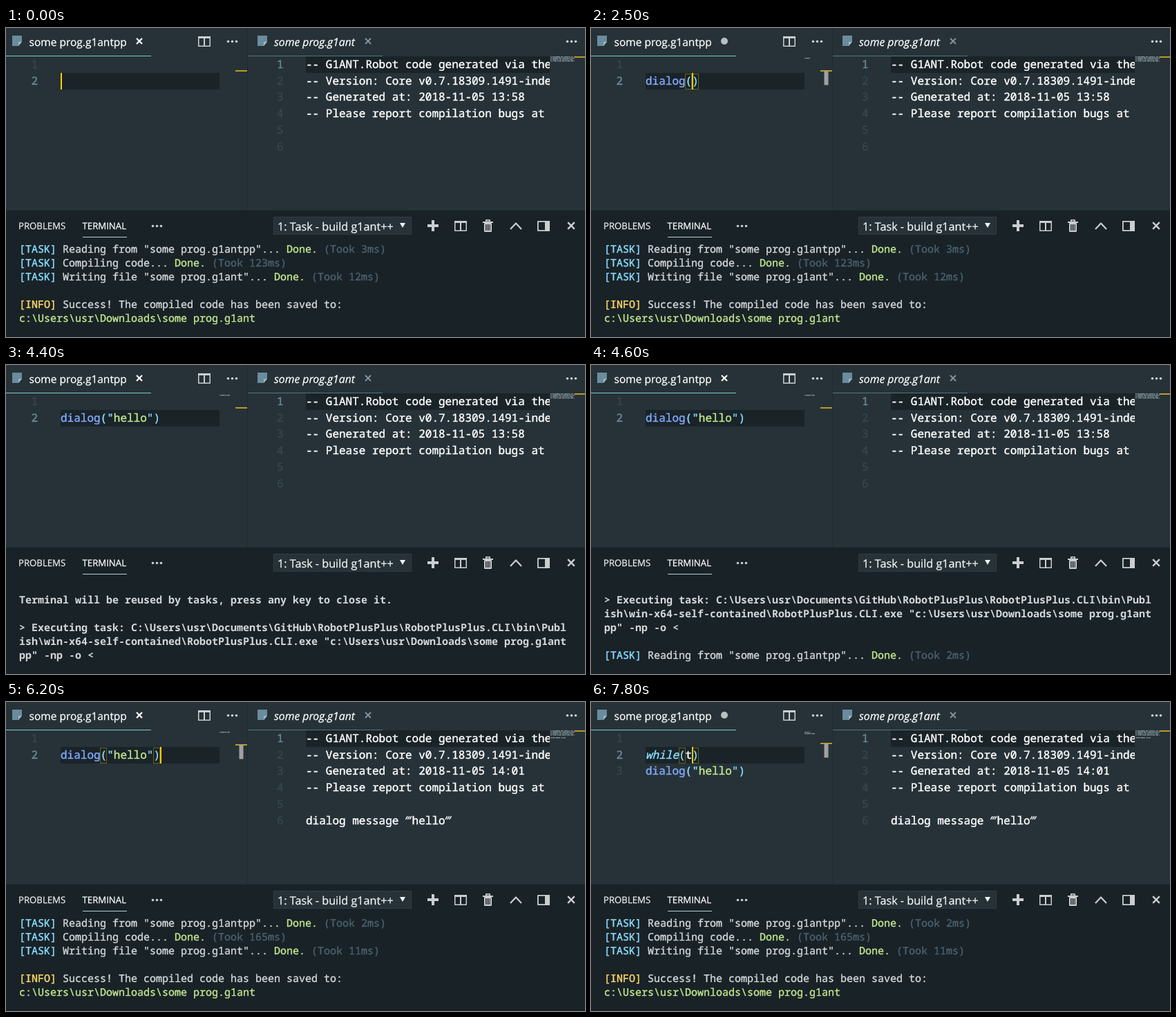
These frames come from a looping animation (838 by 447 pixels, 8000 ms). An HTML page with a canvas:

```html
<!DOCTYPE html>
<html lang="en">
<head>
<meta charset="utf-8">
<title>Editor</title>
<style>
html, body { margin: 0; width: 100%; height: 100%; overflow: hidden; background: #263238; }
canvas { display: block; width: 838px; height: 447px; }
</style>
</head>
<body>
<canvas id="stage" width="838" height="447"></canvas>
<script>
const ctx = document.getElementById('stage').getContext('2d');
const LOOP = 8000;
const MONO = '"Noto Sans Mono", "DejaVu Sans Mono", monospace';
const UI = '"Open Sans", "Noto Sans", sans-serif';
const C = {
  bg: '#263238', panel: '#192227', row: '#1a2328', text: '#ffffff', term: '#d3d7d8',
  cyan: '#89ddff', blue: '#82aaff', green: '#c3e88d', yellow: '#ffd866', grey: '#4a616d',
  num: '#37474f', numOn: '#6c8b98', teal: '#80cbc4', caret: '#ffcc00', mark: '#bd9a22', icon: '#cbced0'
};

const FILE = 'c:\\Users\\usr\\Downloads\\some prog.g1ant';
const report = (a, b, c) => [
  `[TASK] Reading from "some prog.g1antpp"... Done. (Took ${a}ms)`,
  `[TASK] Compiling code... Done. (Took ${b}ms)`,
  `[TASK] Writing file "some prog.g1ant"... Done. (Took ${c}ms)`,
  '', '[INFO] Success! The compiled code has been saved to:', FILE
];
const before = report(3, 123, 12), after = report(2, 165, 11);
const task = [
  '> Executing task: C:\\Users\\usr\\Documents\\GitHub\\RobotPlusPlus\\RobotPlusPlus.CLI\\bin\\Publ',
  'ish\\win-x64-self-contained\\RobotPlusPlus.CLI.exe "c:\\Users\\usr\\Downloads\\some prog.g1ant',
  'pp" -np -o <'
];
const notice = 'Terminal will be reused by tasks, press any key to close it.';
const waiting = ['', notice, '', ...task];
const boldLines = [notice, ...task];

const typed = (text, col, more) => ({ lines: ['', text], col, on: true, ...more });
const second = (text, col, more) => ({ lines: ['', text, 'dialog("hello")'], col, on: true, ...more });

// Each step changes part of the state from its time onward.
const steps = [
  [0, { lines: ['', ''], row: 1, col: 0, on: true, dirty: false, match: null, term: before, built: false }],
  [400, { on: false }], [900, { on: true }], [1400, { on: false }],
  [1600, typed('d', 1, { dirty: true })], [1700, typed('di', 2)], [1800, typed('dia', 3)],
  [2000, typed('dial', 4)], [2100, typed('dialo', 5)], [2200, typed('dialog', 6)],
  [2500, typed('dialog()', 7, { match: [6, 7] })],
  [2800, typed('dialog("")', 8, { match: [6, 9] })], [2900, { match: null }],
  [3200, typed('dialog("h")', 9)], [3300, typed('dialog("he")', 10)],
  [3400, typed('dialog("hell")', 12)], [3600, typed('dialog("hello")', 13)],
  [4100, { on: false, dirty: false }],
  [4300, { term: waiting }],
  [4600, { term: [...waiting.slice(2), '', after[0]].slice(-6) }],
  [4700, { term: [task[2], '', ...after.slice(0, 3), ''], built: true }],
  [4900, { term: after, on: true }],
  [5400, { on: false }],
  [5900, { on: true, col: 14 }], [6000, { match: [6, 14] }], [6200, { col: 15 }],
  [6400, { row: 0, col: 0 }], [6500, { match: null }],
  [6700, second('', 0, { row: 1, dirty: true })],
  [6900, second('w', 1)], [7000, second('wh', 2)], [7100, second('whi', 3)],
  [7200, second('whil', 4)], [7300, second('while', 5)],
  [7600, second('while()', 6, { match: [5, 6] })],
  [7800, second('while(t)', 7, { match: [5, 7] })]
];
const stateAt = t => Object.assign({}, ...steps.filter(s => s[0] <= t).map(s => s[1]));
const baseline = i => Math.round(57.8 + i * 23.8);

function box(x, y, w, h, color) {
  ctx.fillStyle = color;
  ctx.fillRect(x, y, w, h);
}
function frame(x, y, w, h, color, width = 1) {
  ctx.strokeStyle = color;
  ctx.lineWidth = width;
  ctx.strokeRect(x + width / 2, y + width / 2, w - width, h - width);
}
function path(points, color, width) {
  ctx.beginPath();
  points.forEach(([x, y]) => ctx.lineTo(x, y));
  if (width) {
    ctx.strokeStyle = color;
    ctx.lineWidth = width;
    ctx.stroke();
  } else {
    ctx.fillStyle = color;
    ctx.fill();
  }
}
function disc(x, y, r, color) {
  ctx.beginPath();
  ctx.arc(x, y, r, 0, Math.PI * 2);
  ctx.fillStyle = color;
  ctx.fill();
}
// Text with a hairline outline, for a slightly heavier weight.
function write(text, x, y, color, extra) {
  ctx.fillStyle = ctx.strokeStyle = color;
  ctx.lineWidth = extra;
  ctx.fillText(text, x, y);
  if (extra) ctx.strokeText(text, x, y);
}
function label(text, x, y, size, color, style = '') {
  ctx.font = `${style} ${size}px ${UI}`;
  write(text, x, y, color, 0.25);
}
// Monospaced text on a fixed character grid.
function mono(text, x, y, size, color, style = '') {
  ctx.font = `${style} ${size}px ${MONO}`;
  const extra = style === 'bold' ? 0 : 0.4;
  [...text].forEach((ch, i) => { if (ch !== ' ') write(ch, x + i * size * 0.6, y, color, extra); });
}
function tokens(text, rule, paint) {
  for (const m of text.matchAll(rule)) paint(m[0], m.index);
}

const dots = (x, y) => [-6, 0, 6].forEach(d => disc(x + d, y, 1.8, C.icon));
function cross(x, y, r, color, width) {
  path([[x - r, y - r], [x + r, y + r]], color, width);
  path([[x - r, y + r], [x + r, y - r]], color, width);
}
function fileIcon(x) {
  path([[x, 11], [x + 14, 11], [x + 14, 20], [x + 9, 26], [x, 26]], '#6a8c9c');
  path([[x + 9, 26], [x + 9, 20], [x + 14, 20]], '#9db8c4');
}
function splitIcon(x, y) {
  frame(x, y, 18, 15, C.icon, 1.5);
  box(x, y, 18, 3, C.icon);
  box(x + 8, y, 2, 15, C.icon);
}

function minimap(lines, x, limit) {
  lines.forEach((line, i) => tokens(line.slice(0, limit), /\S/g, (ch, c) =>
    box(x + c, 41 + i * 2, 1, 1.4, `rgba(210,230,235,${0.35 + (ch.charCodeAt(0) % 4) * 0.09})`)));
}

function codeLine(text, y) {
  const call = /^\w+(?=\()/.exec(text);
  tokens(text, /^\w+|"|[()]|\w+/g, (part, i) => {
    let color = C.text, style = '';
    if (i === 0 && call) {
      const loop = part === 'while';
      color = loop ? C.cyan : C.blue;
      style = loop ? 'italic' : '';
    } else if (/["()]/.test(part)) color = C.cyan;
    else if (text.includes('"')) color = C.green;
    mono(part, 79 + i * 9.6, y, 16, color, style);
  });
}

function leftEditor(s, t) {
  const top = 41 + s.row * 24;
  box(79, top, 230, 24, C.row);
  s.lines.forEach((line, i) => {
    const y = baseline(i);
    mono(String(i + 1), 36.5, y, 16, i === s.row ? C.numOn : C.num);
    codeLine(line, y);
  });
  if (s.match) s.match.forEach(c =>
    frame(Math.round(78.6 + c * 9.6), 66, 10, 23, 'rgba(255,204,0,.36)'));
  if (s.on) box(Math.round(79 + s.col * 9.6), top, 2, 24, C.caret);
  minimap(s.lines, 309, 22);

  const fade = t < 6700 ? 0 : Math.min(1, Math.max(0, (7700 - t) / 800));
  if (fade) box(331, 43, 18, 180, `rgba(128,145,150,${0.26 * fade})`);
  const y = s.row ? (s.lines.length > 2 ? 59 : 61) : 41;
  box(332, y, 17, 2, C.mark);
  if (s.match) box(337.5, y + 1, 6, 20.5, '#a0a0a0');
}

function rightEditor(s) {
  const lines = [
    '-- G1ANT.Robot code generated via the compiler',
    '-- Version: Core v0.7.18309.1491-indev build',
    `-- Generated at: 2018-11-05 ${s.built ? '14:01' : '13:58'}`,
    '-- Please report compilation bugs at the page',
    '', s.built ? 'dialog message ‴hello‴' : ''
  ];
  box(434, 41, 353, 24, C.row);
  ctx.save();
  ctx.beginPath();
  ctx.rect(350, 41, 437, 222);
  ctx.clip();
  lines.forEach((line, i) => {
    const y = baseline(i);
    mono(String(i + 1), 392, y, 16, i ? C.num : C.numOn);
    mono(line, 434, y, 16, C.text);
  });
  ctx.restore();
  minimap(lines, 788, 35);
  box(823, 41, 15, 2, C.mark);
}

function tabs(s) {
  fileIcon(9);
  label('some prog.g1antpp', 33.5, 26, 15.5, '#ffffff');
  if (s.dirty) disc(193, 19, 5, '#b9bfc1');
  else cross(193, 19, 4, '#ffffff', 2.2);
  box(0, 40, 210, 1, C.teal);
  splitIcon(278, 12);
  dots(327.5, 19.5);
  fileIcon(364);
  label('some prog.g1ant', 388, 26, 15.8, '#ffffff', 'italic');
  cross(524, 19, 4, '#87969c', 1.8);
  box(350, 40, 195, 1, '#4d7a7b');
  dots(818.5, 19.5);
}

function panelBar() {
  label('PROBLEMS', 18, 291, 13.2, '#e9eced');
  label('TERMINAL', 110.5, 291, 13.2, '#ffffff');
  box(111, 302, 64, 1, '#b4cfd0');
  dots(218.5, 286.5);
  box(387, 273, 200, 26, '#263238');
  frame(387, 273, 200, 26, '#303c42');
  label('1: Task - build g1ant++', 393, 293, 16.2, '#f2f5f5');
  path([[570, 282], [578, 282], [574, 289]], '#f2f5f5');
  box(610, 284, 16, 4, C.icon);
  box(616, 278, 4, 16, C.icon);
  splitIcon(649, 279);
  // Bin
  box(690, 280, 15, 2, C.icon);
  frame(694, 277, 7, 4, C.icon, 1.5);
  frame(692, 282, 11, 13, C.icon, 2);
  box(695.5, 284, 1.3, 9, C.icon);
  box(698.5, 284, 1.3, 9, C.icon);
  path([[730, 291], [738, 282.5], [746, 291]], C.icon, 2.2);
  frame(769, 279, 18, 15, C.icon, 1.8);
  box(780, 279, 7, 15, C.icon);
  cross(818, 286, 4.8, C.icon, 2.4);
}

function terminal(rows) {
  rows.forEach((line, i) => {
    const y = 325 + i * 20;
    if (line === FILE) mono(line, 19, y, 15, C.green);
    else if (boldLines.includes(line)) mono(line, 19, y, 15, C.term, 'bold');
    else tokens(line, /\[TASK\]|\[INFO\]|Done\.|\(Took \w+\)|\S+/g, (part, c) => {
      const color = part === '[TASK]' ? C.cyan : part === '[INFO]' ? C.yellow :
        part === 'Done.' ? C.green : part.startsWith('(Took') ? C.grey : C.term;
      mono(part, 19 + c * 9, y, 15, color);
    });
  });
}

function draw(t) {
  const s = stateAt(t);
  ctx.textRendering = 'geometricPrecision';
  ctx.lineJoin = 'round';
  box(0, 0, 838, 447, C.bg);
  box(349, 0, 1, 264, '#202b30');
  tabs(s);
  leftEditor(s, t);
  rightEditor(s);
  box(0, 264, 838, 183, C.panel);
  panelBar();
  terminal(s.term);
}

const start = performance.now();
function tick() {
  draw((performance.now() - start) % LOOP);
  requestAnimationFrame(tick);
}
tick();
</script>
</body>
</html>
```
